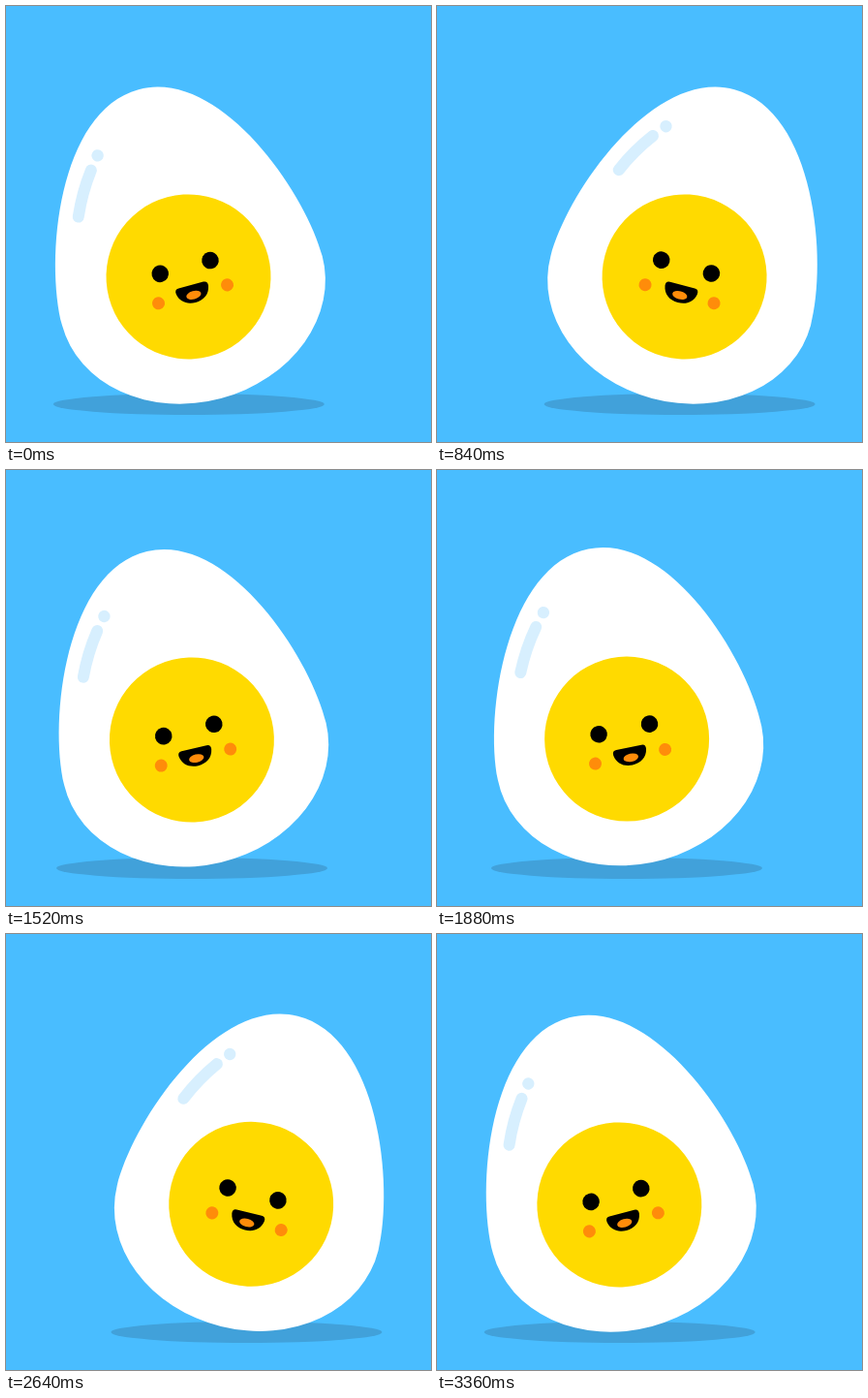
Animation of 439 by 450 pixels, one loop 3400 ms. Source, as an HTML page:

```html
<!DOCTYPE html>
<html>
<head>
<meta charset="utf-8">
<style>
  html, body { margin: 0; height: 100%; overflow: hidden; background: #49bdff; }
  svg { display: block; width: 100vw; height: 100vh; }
</style>
</head>
<body>
<svg viewBox="0 0 439 450">
  <ellipse id="shadow" cx="219.7" cy="411" rx="140" ry="11" fill="#41a1da"/>
  <g id="egg">
    <path fill="#fff" d="M222 75C308 75 361 220 361 290A139 115 0 0 1 83 290C83 220 136 75 222 75Z"/>
    <g fill="#d7effe">
      <circle cx="163.5" cy="130" r="6.2"/>
      <path d="M153 143Q138 163 128 186" fill="none" stroke="#d7effe" stroke-width="12" stroke-linecap="round"/>
    </g>
    <circle cx="222" cy="275" r="85" fill="#ffda00"/>
    <circle cx="194.5" cy="264.5" r="8.8"/>
    <circle cx="248" cy="264.5" r="8.8"/>
    <path d="M209 284H235.500Q240 284 239.500 289C238 298 231 302.500 222.300 302.500S206.500 298 205 289Q204.500 284 209 284Z"/>
    <g fill="#ff8c0a">
      <ellipse cx="222.300" cy="294.700" rx="7.800" ry="4.200"/>
      <circle cx="185" cy="293.500" r="6.500"/>
      <circle cx="258.500" cy="293.500" r="6.500"/>
    </g>
  </g>
</svg>
<script>
  const egg = document.getElementById('egg');
  const shadow = document.getElementById('shadow');
  const HALF = 850, LEAD = 32, TILT = 15, SLIDE = 31;

  // Eases from -1 to 1 as u goes from 0 to 1.
  const ease = u => u < .5 ? (2 * u) ** 2.1 - 1 : 1 - (2 - 2 * u) ** 2.1;

  function draw(now) {
    const phase = (now + LEAD) / HALF % 2;
    const sway = ease(phase < 1 ? phase : 2 - phase);
    egg.setAttribute('transform', `rotate(${TILT * sway} 222 405)`);
    shadow.setAttribute('transform', `translate(${SLIDE * sway} 0)`);
  }

  const start = performance.now();
  function tick() {
    draw(performance.now() - start);
    requestAnimationFrame(tick);
  }
  tick();
</script>
</body>
</html>
```
